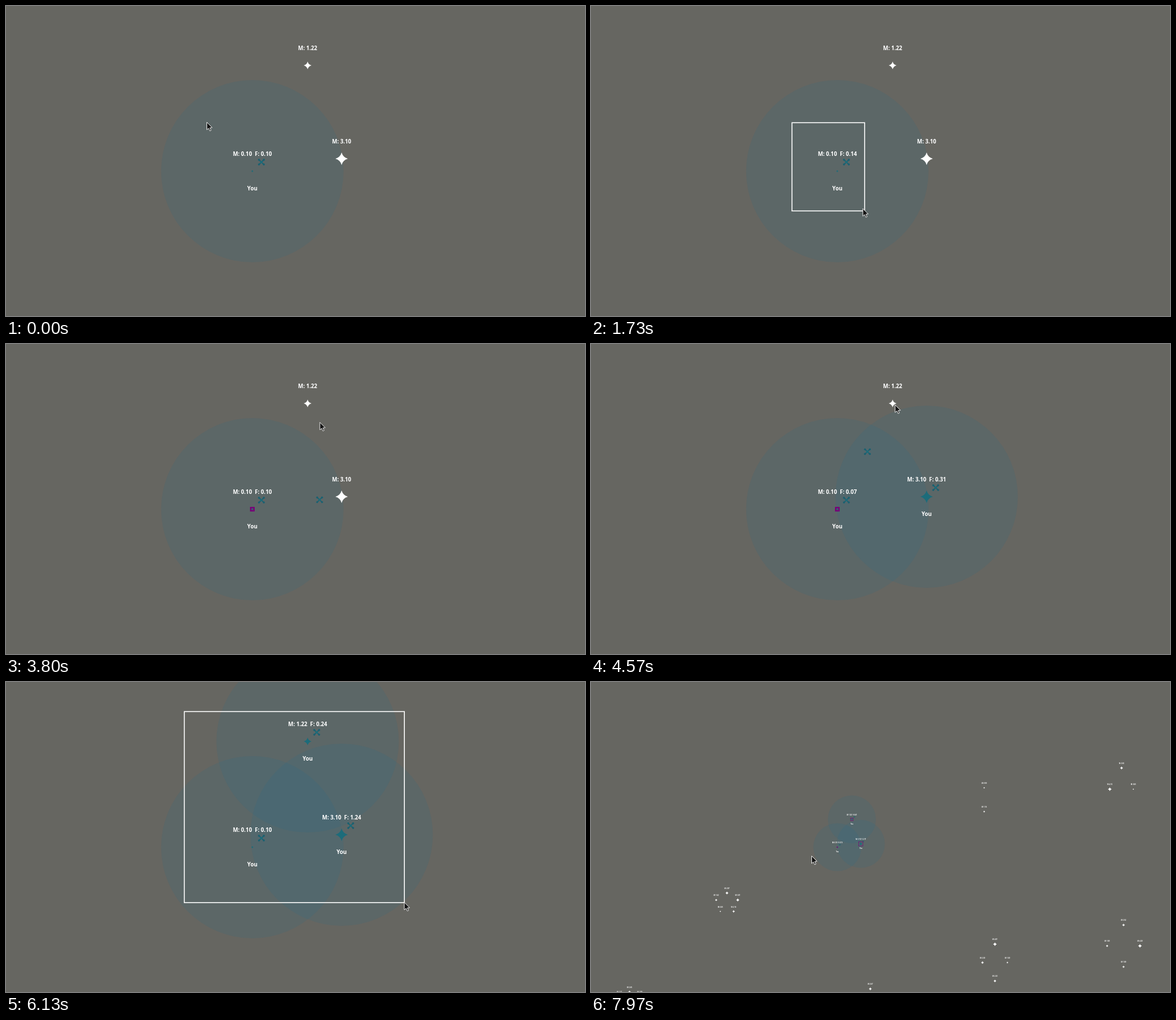
An HTML page with a canvas that plays this animation: 1022x548 px, repeating every 8 s.

```html
<!DOCTYPE html>
<html lang="en">
<head>
<meta charset="utf-8">
<title>Star conquest</title>
<style>
  html, body { margin: 0; width: 100%; height: 100%; overflow: hidden; background: #666661; }
  canvas { display: block; width: 100vw; height: 100vh; }
</style>
</head>
<body>
<canvas id="stage" width="1022" height="548"></canvas>
<script>
const ctx = document.getElementById('stage').getContext('2d');
const LOOP = 8000, RANGE = 161, SHIP_SPEED = 0.171;
const CENTER = { x: 434.8, y: 292 }, FAR_ZOOM = 3.8;
const TEAL = '#1c6c7a', SHIP = '#1b6171', MAGENTA = '#760078';

const home = { ...CENTER, mass: 0.1, owned: 0, fuel: 0.102, launches: [3100, 3900] };
const north = { x: 532.4, y: 105, mass: 1.22, fuel: 0, launches: [] };
const east = { x: 592.4, y: 270, mass: 3.1, fuel: 0, launches: [] };
const systems = [home, north, east];

const flights = [east, north].map((to, i) => {
  const start = home.launches[i];
  to.owned = start + Math.hypot(to.x - home.x, to.y - home.y) / SHIP_SPEED;
  return { to, start, end: to.owned };
});

// Distant clusters are rings of stars, placed as seen at the widest zoom.
const random = n => Math.abs(Math.sin(n * 12.9898) * 43758.5453) % 1;
const cluster = (x, y, count, rx = 0, ry = 0) => Array.from({ length: count }, (_, i) => {
  const angle = i / count * 2 * Math.PI - Math.PI / 2;
  return {
    x: CENTER.x + (x + rx * Math.cos(angle) - CENTER.x) * FAR_ZOOM,
    y: CENTER.y + (y + ry * Math.sin(angle) - CENTER.y) * FAR_ZOOM,
    mass: 0.2 + 4 * random(x + i),
    owned: Infinity
  };
});
const distant = [
  cluster(694, 208, 2, 0, 21), cluster(936.5, 177, 3, 24, 25), cluster(240, 391, 5, 20, 18),
  cluster(713, 496, 4, 22, 32.5), cluster(940, 466.5, 4, 29, 37), cluster(68, 556, 4, 18, 8),
  cluster(493, 542.5, 1)
].flat();

// Pointer moves: start, end, x, y.
const moves = [
  [1050, 1870, 487, 367], [1900, 2470, 516, 300], [2800, 3080, 604, 275],
  [3150, 3600, 556, 90], [3630, 3800, 553.5, 138], [3800, 3900, 540, 108],
  [4470, 5430, 372.5, 71], [5430, 5540, 314, 52], [5570, 6110, 702.5, 389], [6430, 7170, 389, 307]
];
const drags = [
  { x: 354, y: 206, start: 1030, end: 1890 },
  { x: 314, y: 52, start: 5560, end: 6430 }
];

const clamp = (v, low, high) => Math.min(high, Math.max(low, v));
const ease = k => k < 0.5 ? 2 * k * k : 1 - 2 * (1 - k) ** 2;

function pointerAt(t) {
  let x = 354, y = 205;
  for (const [start, end, toX, toY] of moves) {
    const k = ease(clamp((t - start) / (end - start), 0, 1));
    x += (toX - x) * k;
    y += (toY - y) * k;
  }
  return { x, y };
}

const ticks = t => t < 70 ? 0 : 1 + Math.floor((t - 30) / 500);

// Fuel grows with mass on every tick; each launch takes half of it.
function fuelAt(s, t) {
  let fuel = s.fuel, last = s.owned;
  const grow = until => { fuel += s.mass * 0.1 * (ticks(until) - ticks(last)); last = until; };
  for (const launch of s.launches) if (launch <= t) { grow(launch); fuel /= 2; }
  grow(t);
  return fuel;
}

function zoomAt(t) {
  const steps = (start, every, count) => clamp(Math.floor((t - start) / every) + 1, 0, count);
  return 1 + 0.4 * steps(7270, 43, 4) + 0.2 * steps(7570, 80, 6);
}

const isSelected = (s, t) => t >= 6430 || (s === home && t >= 1890 && t < 5200);

function text(str, x, y) {
  ctx.fillStyle = '#fff';
  ctx.fillText(str, x, y);
}

function disc(x, y, r) {
  ctx.beginPath();
  ctx.arc(x, y, r, 0, 2 * Math.PI);
  ctx.fill();
}

function drawStar(s, t) {
  const { x, y } = s, owned = t >= s.owned;
  const r = 6.2 * Math.sqrt(s.mass), c = r * 0.22;
  ctx.fillStyle = owned ? TEAL : '#fff';
  ctx.beginPath();
  ctx.moveTo(x, y - r);
  ctx.quadraticCurveTo(x + c, y - c, x + r, y);
  ctx.quadraticCurveTo(x + c, y + c, x, y + r);
  ctx.quadraticCurveTo(x - c, y + c, x - r, y);
  ctx.quadraticCurveTo(x - c, y - c, x, y - r);
  ctx.fill();

  let label = 'M: ' + s.mass.toFixed(2);
  if (owned) {
    label += '\u00a0 F: ' + fuelAt(s, t).toFixed(2);
    text('You', x, y + 34);
    drawShip(x + 16, y - 16);
    if (isSelected(s, t)) {
      const half = r * 1.24 + 0.4;
      ctx.strokeStyle = MAGENTA;
      ctx.lineWidth = 2.5;
      ctx.strokeRect(x - half, y - half, 2 * half, 2 * half);
    }
  }
  text(label, x, y - 26.7);
}

function drawShip(x, y) {
  ctx.fillStyle = ctx.strokeStyle = SHIP;
  ctx.lineWidth = 1.8;
  for (const side of [-1, 1]) {
    ctx.beginPath();
    ctx.moveTo(x - 4.5, y - 4.5 * side);
    ctx.lineTo(x + 4.5, y + 4.5 * side);
    ctx.stroke();
    disc(x - 4.3, y - 4.1 * side, 1.8);
    disc(x + 4.3, y + 4.1 * side, 1.8);
  }
  ctx.fillStyle = TEAL;
  ctx.fillRect(x - 2, y - 2, 4, 4);
}

const arrow = new Path2D('M0 0V13.3L3.1 10.6 5.3 15.3 7.5 14.3 5.4 9.8 9.5 9.5Z');
function drawPointer({ x, y }) {
  ctx.save();
  ctx.translate(x + 0.5, y + 0.5);
  ctx.fillStyle = '#141414';
  ctx.strokeStyle = '#eee';
  ctx.lineWidth = 1;
  ctx.fill(arrow);
  ctx.stroke(arrow);
  ctx.restore();
}

function drawWorld(t) {
  const scale = 1 / zoomAt(t);
  ctx.save();
  ctx.translate(CENTER.x, CENTER.y);
  ctx.scale(scale, scale);
  ctx.translate(-CENTER.x, -CENTER.y);
  ctx.font = 'bold 9.7px "Noto Sans", sans-serif';
  ctx.textAlign = 'center';

  ctx.fillStyle = 'rgba(22, 106, 146, 0.12)';
  for (const s of systems) if (t >= s.owned) disc(s.x, s.y, RANGE);
  for (const s of [...distant, ...systems]) drawStar(s, t);
  for (const { to, start, end } of flights) if (t >= start && t < end) {
    const k = (t - start) / (end - start);
    drawShip(home.x + (to.x - home.x) * k, home.y + (to.y - home.y) * k);
  }
  ctx.restore();
}

function draw(t) {
  ctx.fillStyle = '#666661';
  ctx.fillRect(0, 0, 1022, 548);
  drawWorld(t);
  for (const d of drags) if (t >= d.start && t < d.end) {
    const corner = pointerAt(t + 30);
    ctx.strokeStyle = '#fff';
    ctx.lineWidth = 1.6;
    ctx.strokeRect(d.x + 0.7, d.y + 0.3, corner.x - d.x, corner.y - d.y + 0.7);
  }
  drawPointer(pointerAt(t));
}

const begin = performance.now();
function frame() {
  draw((performance.now() - begin) % LOOP);
  requestAnimationFrame(frame);
}
frame();
</script>
</body>
</html>
```
